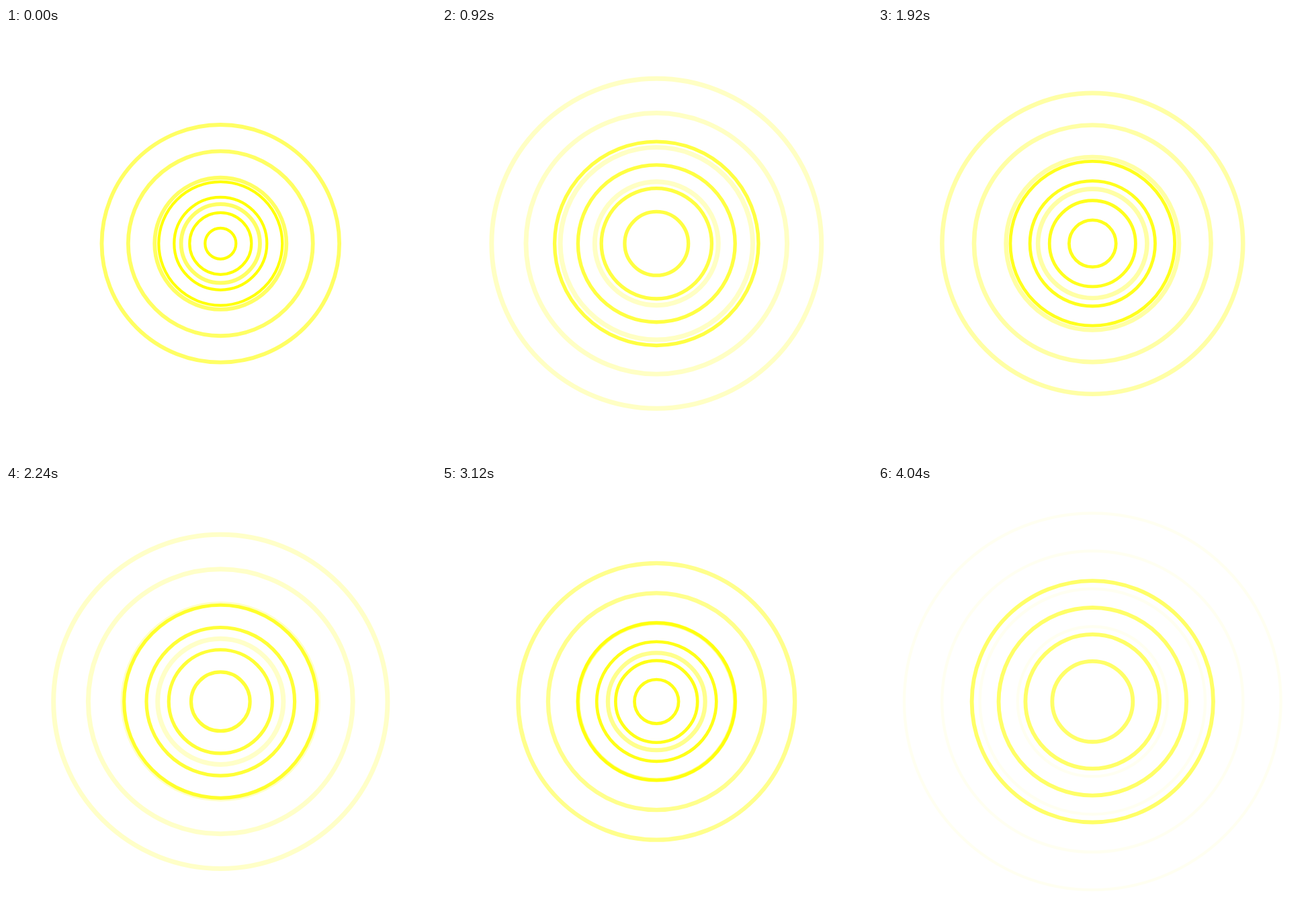
An HTML page with a canvas for the animation above (4.08 s loop, 640 px wide and 640 px high).

```html
<!DOCTYPE html>
<html lang="en">
<head>
<meta charset="utf-8">
<title>Ripples</title>
<style>
  html, body { margin: 0; width: 100%; height: 100%; overflow: hidden; background: #fff; }
  canvas { display: block; width: 100vmin; height: 100vmin; }
</style>
</head>
<body>
<canvas id="stage" width="640" height="640"></canvas>
<script>
const ctx = document.getElementById('stage').getContext('2d');
const LOOP = 4080, STEP = 40, LIFE = 2720;
const CX = 319.3, CY = 320.8, RINGS = 4;

function smooth(x) {
  x = Math.min(1, Math.max(0, x));
  return x * x * (3 - 2 * x);
}

// One wave: four rings that spread, drift outward and fade with age.
function drawWave(age) {
  const late = smooth((age - 2280) / 180);
  const gap = 23 + 0.0128 * age;
  const drift = 0.0102 * age + 3.8e-6 * age * age + 3 * late;
  ctx.globalAlpha = 1 - Math.pow(age / LIFE, 1.25);
  ctx.lineWidth = 4.2 + age / 800 - 3 * late;
  for (let k = 1; k <= RINGS; k++) {
    ctx.beginPath();
    ctx.arc(CX, CY, drift + k * gap, 0, Math.PI * 2);
    ctx.stroke();
  }
}

function draw(time) {
  const t = Math.floor((time % LOOP) / STEP) * STEP;
  ctx.globalAlpha = 1;
  ctx.fillStyle = '#fff';
  ctx.fillRect(0, 0, 640, 640);
  ctx.strokeStyle = '#ff0';
  drawWave(t % LIFE);
  drawWave((t + 1280) % LIFE);
}

let start;
function tick(now) {
  if (start === undefined) start = now;
  draw(Math.max(0, now - start));
  requestAnimationFrame(tick);
}
draw(0);
requestAnimationFrame(tick);
</script>
</body>
</html>
```
